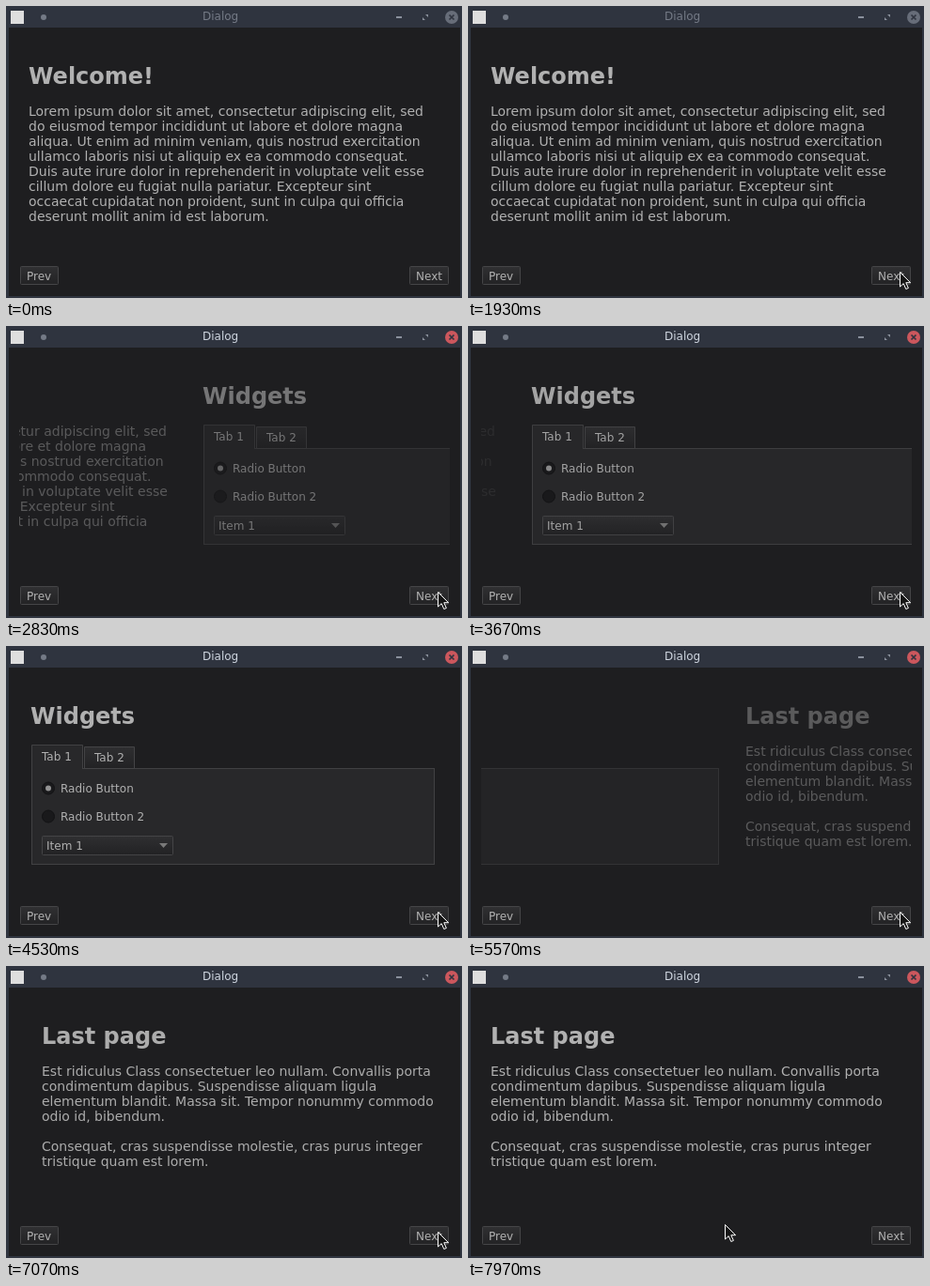
An HTML page that plays this animation: 485x311 px, repeating every 8 s.

```html
<!DOCTYPE html>
<html lang="en">
<head>
<meta charset="utf-8">
<title>Dialog</title>
<style>
  html, body { margin: 0; width: 100%; height: 100%; overflow: hidden; background: #2f343f; }
  svg { display: block; }
  text { font: 12px "DejaVu Sans", sans-serif; fill: #b1b1b1; white-space: pre; }
  .heading { font-size: 24px; font-weight: bold; }
  .body { font-size: 14px; }
  .box { fill: #29292b; stroke: #424244; }
  .field { fill: url(#shade); stroke: #454547; }
  .radio { fill: #19191b; stroke: #121214; }
  #title { fill: #747a86; }
  #close { fill: #676d79; }
  .focused #title { fill: #cfd6e0; }
  .focused #close { fill: #cc575d; }
</style>
</head>
<body>
<svg id="stage" width="485" height="311">
  <defs>
    <linearGradient id="shade" x2="0" y2="1">
      <stop stop-color="#303032"/><stop offset="1" stop-color="#232325"/>
    </linearGradient>
  </defs>

  <!-- Window frame -->
  <rect width="485" height="311" fill="#2f343f"/>
  <rect x="3" y="23" width="480" height="286" fill="#1e1e20"/>
  <rect x="5" y="5" width="14" height="14" fill="#dedede"/>
  <circle cx="40" cy="12" r="3" fill="#747a86"/>
  <text id="title" x="209" y="15">Dialog</text>
  <path d="M415 11h6v2h-6z M446 9h3v3z M443 12v3h3z" fill="#8a909c"/>
  <circle id="close" cx="474" cy="12" r="7"/>
  <path d="M471.5 9.5l5 5m0-5l-5 5" stroke="#2f343f" stroke-width="1.7"/>

  <!-- Sliding pages -->
  <svg x="14" y="24" width="458" height="244" viewBox="14 24 458 244">
    <g class="page">
      <text class="heading" x="24" y="83">Welcome!</text>
    </g>
    <g class="page">
      <text class="heading" x="24" y="83">Widgets</text>
      <rect class="box" x="25.5" y="130.5" width="428" height="102"/>
      <path class="field" d="M81.5 130.5v-23h53v23z"/>
      <path class="box" d="M25.5 131v-25.5h54v25.5"/>
      <text x="36" y="122">Tab 1</text>
      <text x="92" y="123">Tab 2</text>
      <circle class="radio" cx="43" cy="151.5" r="6.5"/>
      <circle cx="43" cy="151.5" r="3" fill="#949494"/>
      <text x="56" y="156">Radio Button</text>
      <circle class="radio" cx="43" cy="181.5" r="6.5"/>
      <text x="56" y="186">Radio Button 2</text>
      <rect class="field" x="36.5" y="202.5" width="139" height="20" rx="1"/>
      <text x="41" y="217">Item 1</text>
      <path d="M161 210h9l-4.500 5z" fill="#7a7a7a"/>
    </g>
    <g class="page">
      <text class="heading" x="24" y="83">Last page</text>
    </g>
  </svg>

  <!-- Buttons -->
  <rect class="field" x="15.500" y="277.500" width="40" height="19" rx="1"/>
  <text x="22" y="292">Prev</text>
  <rect class="field" x="429.500" y="277.500" width="41" height="19" rx="1"/>
  <text x="436" y="292">Next</text>

  <path id="cursor" d="M.5 .5v15.500l3.700-3.400 2.600 5.900 2.600-1.100-2.600-5.700h4.800z" fill="#141414" stroke="#fff"/>
</svg>

<script>
const LOOP = 8000, PAGE_WIDTH = 458;
const stage = document.getElementById('stage');
const cursor = document.getElementById('cursor');
const pages = [...document.querySelectorAll('.page')];

const paragraphs = [
  `Lorem ipsum dolor sit amet, consectetur adipiscing elit, sed
do eiusmod tempor incididunt ut labore et dolore magna
aliqua. Ut enim ad minim veniam, quis nostrud exercitation
ullamco laboris nisi ut aliquip ex ea commodo consequat.
Duis aute irure dolor in reprehenderit in voluptate velit esse
cillum dolore eu fugiat nulla pariatur. Excepteur sint
occaecat cupidatat non proident, sunt in culpa qui officia
deserunt mollit anim id est laborum.`,
  '',
  `Est ridiculus Class consectetuer leo nullam. Convallis porta
condimentum dapibus. Suspendisse aliquam ligula
elementum blandit. Massa sit. Tempor nonummy commodo
odio id, bibendum.

Consequat, cras suspendisse molestie, cras purus integer
tristique quam est lorem.`
];

paragraphs.forEach((paragraph, i) => paragraph.split('\n').forEach((line, row) => {
  const text = document.createElementNS('http://www.w3.org/2000/svg', 'text');
  text.setAttribute('class', 'body');
  text.setAttribute('x', 24);
  text.setAttribute('y', 117 + 16 * row);
  text.textContent = line;
  pages[i].append(text);
}));

const progress = (t, start, end) => Math.min(1, Math.max(0, (t - start) / (end - start)));
const outCubic = u => 1 - (1 - u) ** 3;
const smooth = u => u * u * (3 - 2 * u);

function draw(t) {
  stage.classList.toggle('focused', t >= 1990);

  const scroll = outCubic(progress(t, 2059, 5014)) + outCubic(progress(t, 5113, 7962));
  pages.forEach((page, i) => {
    page.setAttribute('transform', `translate(${Math.round((i - scroll) * PAGE_WIDTH)})`);
    page.setAttribute('opacity', Math.max(0, 1 - Math.abs(i - scroll)));
  });

  const enter = outCubic(progress(t, 1050, 1450));
  const leave = smooth(progress(t, 7430, 7960));
  const x = Math.round(486 - 27 * enter - 186 * leave);
  const y = Math.round(271 + 12 * enter - 8 * leave);
  cursor.setAttribute('transform', `translate(${x} ${y})`);
}

function tick(now) {
  draw(now % LOOP);
  requestAnimationFrame(tick);
}
draw(0);
requestAnimationFrame(tick);
</script>
</body>
</html>
```
